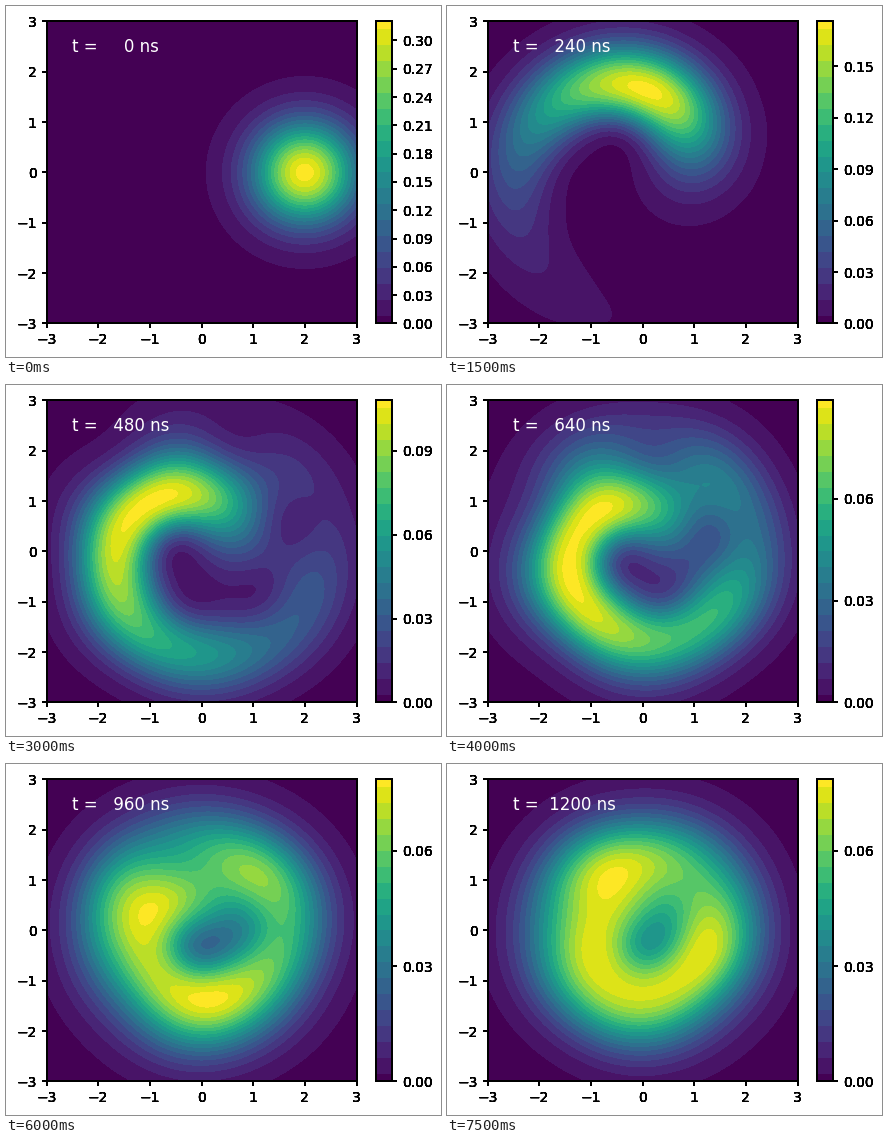
Recreate the animation shown at these times as a matplotlib script. Size 435 by 351 pixels, loop 8000 ms.

```python
import math

import numpy as np
import matplotlib.pyplot as plt
from matplotlib.animation import FuncAnimation

W, H, DPI = 435, 351, 100
FRAMES, STEP_NS = 16, 80

# Damped Kerr oscillator started in a coherent state
ALPHA = 2.0
KERR = 2 * math.pi * 0.325e-3
KAPPA = 5.7e-4
DIM = 40

BANDS = 20
EDGES = np.concatenate([[0], (np.arange(BANDS - 1) + 0.5) / (BANDS - 1), [1]])
COLORS = plt.get_cmap("viridis")(np.linspace(0, 1, BANDS))

# Upper end of the colour scale over time
TOP_T = [0, 160, 320, 480, 640, 720, 800, 880, 1040, 1120, 1200]
TOP_V = [0.32, 0.2153, 0.144, 0.108, 0.0889, 0.083,
         0.08, 0.0785, 0.0785, 0.078, 0.0785]

axis = np.linspace(-3, 3, 181)
X, Y = np.meshgrid(axis, axis)
n = np.arange(DIM)
root_fact = np.sqrt([float(math.factorial(k)) for k in n])
beta = (X + 1j * Y).ravel()
basis = beta.conj()[:, None] ** n / root_fact
weight = np.exp(-np.abs(beta) ** 2) / math.pi


def density(t):
    m, k = n[:, None], n[None, :]
    lam = KAPPA - 1j * KERR * (m - k)
    jumps = ALPHA**2 * KAPPA / lam * (1 - np.exp(-lam * t))
    phase = 0.5j * KERR * t * (m**2 - k**2)
    amp = (ALPHA**n / root_fact)[:, None] * (ALPHA**n / root_fact)
    return amp * np.exp(jumps - ALPHA**2 + phase - KAPPA * t * (m + k) / 2)


def husimi(t):
    q = weight * ((basis @ density(t)) * basis.conj()).sum(axis=1).real
    return q.reshape(X.shape)


# The small excess keeps float rounding from losing a pixel
fig = plt.figure(figsize=((W + 0.01) / DPI, (H + 0.01) / DPI), dpi=DPI,
                 facecolor="white")


def add_axes(left, width):
    ax = fig.add_axes([left / W, 33.5 / H, width / W, 302 / H])
    ax.tick_params(width=1.44, length=3.5, labelleft=False,
                   labelright=False, labelbottom=False)
    for spine in ax.spines.values():
        spine.set_linewidth(1.44)
    return ax


def label(ax, s, xy, offset, ha, va):
    """Overdrawn label, which hardens its edges."""
    return [ax.annotate(s, xy, xytext=offset, textcoords="offset points",
                        ha=ha, va=va, fontsize=10, annotation_clip=False)
            for _ in range(6)]


ax = add_axes(40.5, 310)
ax.set(xlim=(-3, 3), ylim=(-3, 3), xticks=range(-3, 4), yticks=range(-3, 4))
for v in range(-3, 4):
    s = str(v).replace("-", "\u2212")
    label(ax, s, (v, -3), (0, -7), "center", "top")
    label(ax, s, (-3, v), (-7, 0), "right", "center_baseline")
clock = ax.text(-2.5, 2.4, "", color="white", fontsize=12, zorder=5)

bar = add_axes(370, 16)
bar.pcolormesh([0, 1], EDGES, np.arange(BANDS)[:, None], cmap="viridis")
bar.set(xlim=(0, 1), ylim=(0, 1), xticks=[])
bar.yaxis.tick_right()
bar.tick_params(labelright=False)

drawn = []


def update(i):
    while drawn:
        drawn.pop().remove()
    t = i * STEP_NS
    q = husimi(t)
    levels = EDGES.copy()
    levels[0], levels[-1] = -0.01, 1.01
    drawn.append(ax.contourf(X, Y, q / q.max(), levels=levels, colors=COLORS))
    clock.set_text(f"t = {t:5d} ns")

    top = math.exp(np.interp(t, TOP_T, np.log(TOP_V)))
    ticks = np.arange(0, top, 0.03)
    bar.set_yticks(ticks / top)
    for v in ticks:
        drawn.extend(label(bar, f"{v:.2f}", (1, v / top), (7, 0),
                           "left", "center_baseline"))
    return []


anim = FuncAnimation(fig, update, frames=FRAMES, interval=500,
                     init_func=lambda: update(0), repeat=True, blit=False)
plt.show()
```
